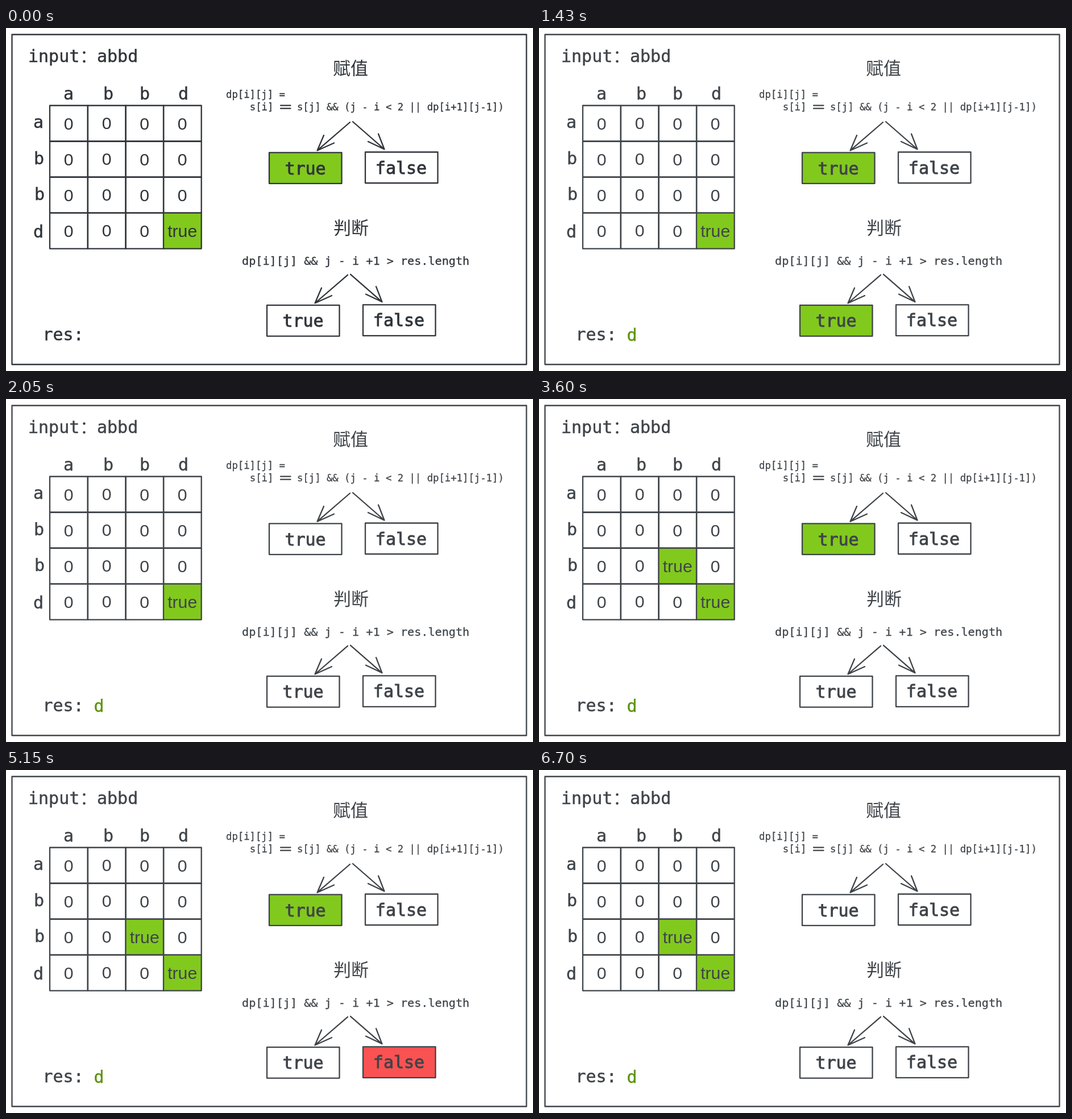
Animation, 927 px wide and 604 px high, one loop 8 s. Source, as an HTML page:

```html
<!DOCTYPE html>
<html lang="zh-CN">
<head>
<meta charset="utf-8">
<title>Palindrome table</title>
<style>
  html, body { margin: 0; width: 100%; height: 100%; overflow: hidden; background: #fff; }
  svg { display: block; width: 927px; height: 604px; color: #30353a; }
  text { fill: currentColor; white-space: pre; }
  rect, path { fill: none; stroke: currentColor; stroke-width: 2.3; stroke-linecap: round; stroke-linejoin: round; }
  .mono { font: 30px "DejaVu Sans Mono", "Noto Sans Mono", monospace; stroke: currentColor; stroke-width: 0.015em; }
  .bold { stroke-width: 0.03em; }
  .sans { font: 30.2px "Liberation Sans", Arial, sans-serif; }
  .cjk { font: 31px "Noto Sans CJK SC", "Noto Sans CJK", sans-serif; }
  .mid { text-anchor: middle; }
</style>
</head>
<body>
<svg id="stage" viewBox="0 0 927 604"></svg>
<script>
const GREEN = '#82c91e', RED = '#fa5252', RESULT = '#5c940d';
const LOOP = 8000;
const stage = document.getElementById('stage');

function add(tag, attrs, parent = stage) {
  const el = document.createElementNS('http://www.w3.org/2000/svg', tag);
  for (const key in attrs) el.setAttribute(key, attrs[key]);
  parent.append(el);
  return el;
}

function label(str, x, y, cls, size, parent) {
  const el = add('text', { x, y, class: cls }, parent);
  if (size) el.style.fontSize = size + 'px';
  el.textContent = str;
  return el;
}

const box = (x, y, width, height, parent) => add('rect', { x, y, width, height }, parent);

// Frame and captions
box(10.5, 11.5, 905, 581);
label('input', 39, 59.7, 'mono');
label('：', 130, 59.5, 'cjk', 30);
label('abbd', 160, 59.7, 'mono');
label('res:', 64.5, 549.5, 'mono');
const result = label('d', 154.5, 551, 'mono');
result.style.color = RESULT;

// Table
const cols = [77, 144, 210.5, 277], rows = [136.5, 199.5, 262.6, 325.6];
const cells = rows.map((y, r) => cols.map((x, c) => {
  const rect = box(x, y, 66.7, 63);
  const text = label('0', x + 33.2, y + (c === 1 ? 41.3 : 42), 'sans mid');
  return { rect, text };
}));
[110, 180, 244, 312].forEach((x, i) => label('abbd'[i], x, i % 3 ? 126 : 125.5, 'mono mid'));
[[57, 176], [58, 240], [59, 303], [57, 369]].forEach(([x, y], i) => label('abbd'[i], x, y, 'mono mid'));

// Formulas
label('赋值', 606, 82, 'cjk mid');
label('dp[i][j] =', 387, 122.5, 'mono', 17.28);
label('s[i]    s[j] && (j - i < 2 || dp[i+1][j-1])', 428.8, 144.6, 'mono', 17.28);
add('path', { d: 'M483 136.3h17.5M483 141.7h17.5' });
label('判断', 607, 363, 'cjk mid');
label('dp[i][j] && j - i +1 > res.length', 415, 417, 'mono', 20.15);

// Two arrows leading to a true box and a false box
function branch(dx, dy) {
  const g = add('g', { transform: `translate(${dx} ${dy})` });
  add('path', { d: 'M605 166L547.5 215.7M559 189L547.5 215.7L577 202.5' }, g);
  add('path', { d: 'M610 165L665.5 213.5M655 186.5L665.5 213.5L637 200' }, g);
  const yes = box(463, 219.3, 127.5, 54.5, g);
  const no = box(632, 218.5, 127.5, 54.5, g);
  label('true', 526.5, 257.5, 'mono bold mid', 30, g);
  label('false', 695, 256.5, 'mono bold mid', 30, g);
  return { yes, no };
}
const assign = branch(0, 0), judge = branch(-4, 268.8);

const steps = [
  { at: 0, assign: true, ink: '#30353a' },
  { at: 500, assign: true, judge: 'yes', res: true },
  { at: 2050, res: true },
  { at: 3600, assign: true, res: true, pair: true },
  { at: 5150, assign: true, judge: 'no', res: true, pair: true },
  { at: 6700, res: true, pair: true }
];

const paint = (rect, color) => { rect.style.fill = color || 'none'; };

function setCell({ rect, text }, on) {
  paint(rect, on && GREEN);
  text.textContent = on ? 'true' : '0';
}

function show(step) {
  stage.style.color = step.ink || '#3f4449';
  paint(assign.yes, step.assign && GREEN);
  paint(judge.yes, step.judge === 'yes' && GREEN);
  paint(judge.no, step.judge === 'no' && RED);
  setCell(cells[3][3], true);
  setCell(cells[2][2], step.pair);
  result.style.visibility = step.res ? 'visible' : 'hidden';
}

let current;
function tick() {
  const time = performance.now() % LOOP;
  const step = steps.findLast(s => s.at <= time);
  if (step !== current) show(current = step);
  requestAnimationFrame(tick);
}
tick();
</script>
</body>
</html>
```
